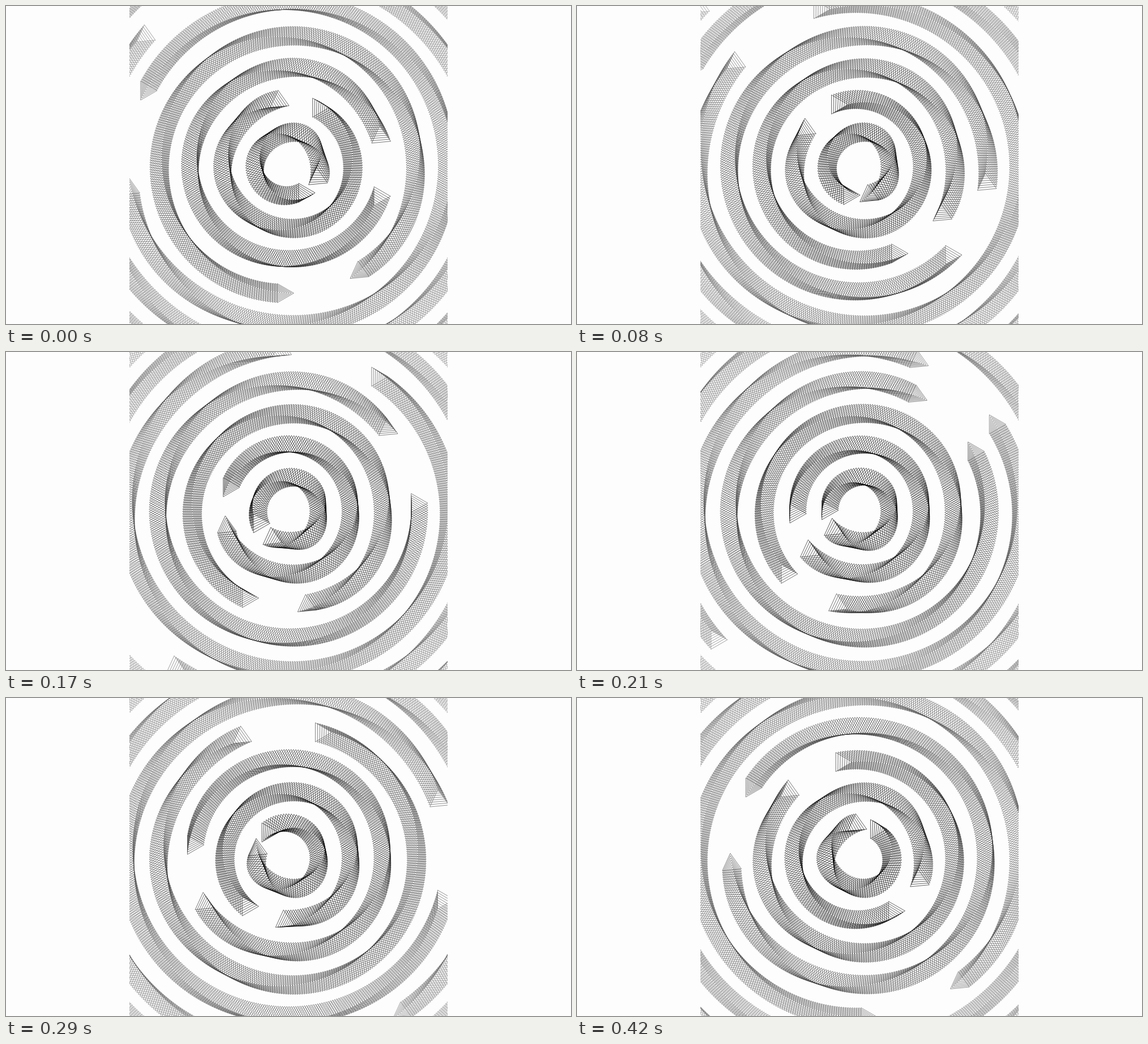
Recreate the animation shown at these times as an HTML page with a canvas. Size 998 by 561 pixels, loop 510 ms.

```html
<!DOCTYPE html>
<html lang="en">
<head>
<meta charset="utf-8">
<title>Triangle rings</title>
<style>
  html, body { margin: 0; width: 100%; height: 100%; overflow: hidden; background: #fdfdfd; }
  canvas { display: block; }
</style>
</head>
<body>
<canvas id="stage" width="998" height="561"></canvas>
<script>
const ctx = document.getElementById('stage').getContext('2d');
const RAD = Math.PI / 180;
const LOOP = 510;
const CENTER = { x: 499, y: 280 };
const GAP = 56.7;       // distance between rings
const SIZE = 19.5;      // triangle circumradius
const PER_RING = 80;    // triangles per ring index
const SWEEP = 324;      // degrees covered by each ring
const TURN = 24;        // degrees per step

// Start angle of each ring; odd rings turn clockwise, even ones back.
const starts = [61, -62.5, 19.1, 92.6, 207.5, 258, 212.6];

// Times of the hard changes; the last one skips a step.
const times = [0, 40, 80, 130, 170, 210, 250, 290, 330, 420];

function stepAt(ms) {
  const i = times.filter(t => t <= ms).length - 1;
  return i === 9 ? 10 : i;
}

// Triangles swing out and back along the sweep (radians).
const swing = t => Math.sin(2.7 * t);

function triangle(x, y, angle) {
  for (let k = 0; k < 3; k++) {
    const a = angle + k * 120 * RAD;
    ctx.lineTo(x + SIZE * Math.cos(a), y + SIZE * Math.sin(a));
  }
  ctx.closePath();
}

function ring(index, start) {
  const count = PER_RING * index;
  const radius = GAP * index;
  const gray = 22 * (index - 1);
  ctx.strokeStyle = `rgb(${gray}, ${gray}, ${gray})`;
  for (let i = 0; i <= count; i++) {
    const t = i / count;
    const a = (start + SWEEP * t) * RAD;
    ctx.beginPath();
    triangle(CENTER.x + radius * Math.cos(a), CENTER.y + radius * Math.sin(a), swing(t));
    ctx.stroke();
  }
}

function draw(step) {
  ctx.fillStyle = '#fdfdfd';
  ctx.fillRect(0, 0, 998, 561);
  ctx.save();
  ctx.beginPath();
  ctx.rect(218, 0, 562, 561);
  ctx.clip();
  ctx.lineWidth = 0.65;
  starts.forEach((start, i) => {
    const dir = i % 2 ? -1 : 1;
    ring(i + 1, start + dir * TURN * step);
  });
  ctx.restore();
}

let shown = -1;
const origin = performance.now();

function tick() {
  const step = stepAt((performance.now() - origin) % LOOP);
  if (step !== shown) draw(shown = step);
  requestAnimationFrame(tick);
}
tick();
</script>
</body>
</html>
```
